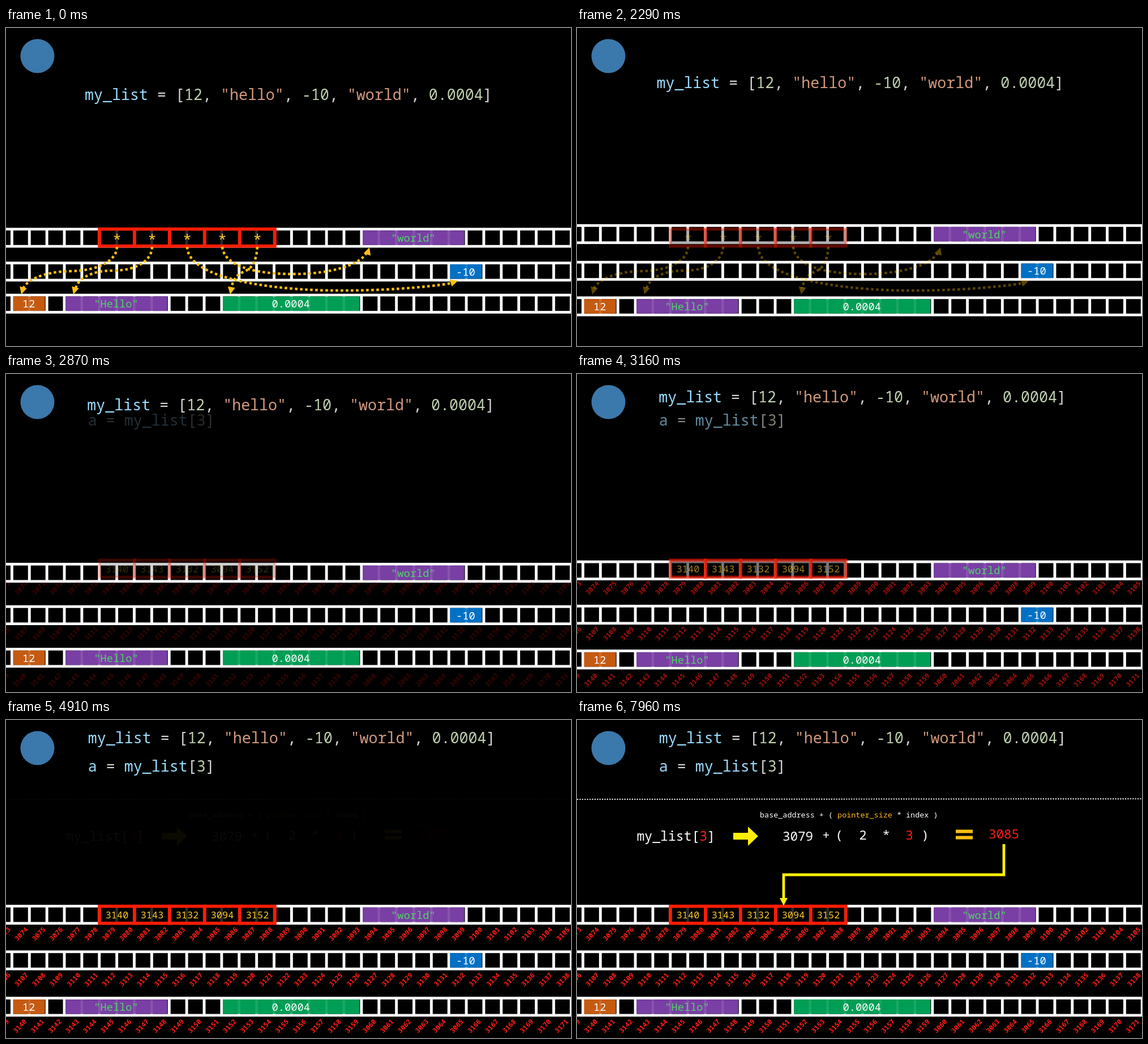
Recreate the animation shown at these times as an HTML page with a canvas. Size 998 px wide and 561 px high, loop 8000 ms.

```html
<!DOCTYPE html>
<html lang="en">
<head>
<meta charset="utf-8">
<title>List memory layout</title>
<style>
html, body { margin: 0; width: 100%; height: 100%; overflow: hidden; background: #000; }
canvas { display: block; }
</style>
</head>
<body>
<canvas id="stage" width="998" height="561"></canvas>
<script>
const ctx = document.getElementById('stage').getContext('2d');
const LOOP = 8000;
const PITCH = 30.87, LEFT = 10.6;
const GOLD = '#ffc010', RED = '#ff1e14', YELLOW = '#ffee08', WHITE = '#fff';
const NAME = '#9cdcfe', PUNCT = '#d4d4d4', NUMBER = '#bfd0b0', STRING = '#d29a7f';

const clamp = v => Math.max(0, Math.min(1, v));
const ramp = (t, from, to) => clamp((t - from) / (to - from));
const mix = (a, b, p) => a + (b - a) * p;
const edge = cell => LEFT + cell * PITCH;

// Slide motion: [time, progress, slope per ms], joined by Hermite curves.
const MOVE = [
  [1930, 0, 0.0005], [2290, 0.24, 0.00078], [2870, 0.73, 0.00074],
  [3580, 0.98, 0.0001], [4120, 1, 0]
];

function moveProgress(t) {
  if (t <= MOVE[0][0]) return 0;
  for (let i = 1; i < MOVE.length; i++) {
    const [t0, p0, s0] = MOVE[i - 1], [t1, p1, s1] = MOVE[i];
    if (t > t1) continue;
    const d = t1 - t0, u = (t - t0) / d, v = 1 - u;
    return p0 * (1 + 2 * u) * v * v + s0 * d * u * v * v +
           p1 * u * u * (3 - 2 * u) - s1 * d * u * u * v;
  }
  return 1;
}

function setFont(size, weight = 400) {
  ctx.font = `${weight} ${size}px "Noto Sans Mono", "DejaVu Sans Mono", monospace`;
}

function label(text, x, y, size, color, align = 'center') {
  setFont(size);
  ctx.textAlign = align;
  ctx.fillStyle = color;
  ctx.fillText(text, x, y);
}

function spans(parts, x, y, size) {
  for (const [text, color] of parts) {
    label(text, x, y, size, color, 'left');
    x += ctx.measureText(text).width;
  }
}

function layer(alpha, draw) {
  if (alpha <= 0) return;
  ctx.save();
  ctx.globalAlpha = alpha;
  draw();
  ctx.restore();
}

function polygon(points, color) {
  ctx.fillStyle = color;
  ctx.beginPath();
  points.forEach(([x, y]) => ctx.lineTo(x, y));
  ctx.fill();
}

const TITLE = [
  ['my_list', NAME], [' = [', PUNCT], ['12', NUMBER], [', ', PUNCT], ['"hello"', STRING],
  [', ', PUNCT], ['-10', NUMBER], [', ', PUNCT], ['"world"', STRING], [', ', PUNCT],
  ['0.0004', NUMBER], [']', PUNCT]
];
const LOOKUP = [['a', NAME], [' = ', PUNCT], ['my_list', NAME], ['[', PUNCT], ['3', NUMBER], [']', PUNCT]];

const GREEN = '#4fd468';
const ROWS = [
  { from: 370, to: 343.5, blocks: [[20, 6, '"world"', '#793fa4', GREEN]] },
  { from: 429.7, to: 424, blocks: [[25, 2, '-10', '#0070c4', WHITE]] },
  { from: 486.3, to: 505.8, blocks: [
    [0, 2, '12', '#c55a11', WHITE],
    [3, 6, '"Hello"', '#793fa4', GREEN],
    [12, 8, '0.0004', '#009e55', WHITE]
  ] }
];

function drawRow(y, blocks) {
  ctx.fillStyle = WHITE;
  ctx.fillRect(0, y - 17.5, 998, 35);
  ctx.fillStyle = '#000';
  for (let i = -1; i < 32; i++) ctx.fillRect(edge(i) + 2.3, y - 12.8, PITCH - 4.9, 25.6);
  for (const [cell, count, text, color, ink] of blocks) {
    const x = edge(cell) + 2, w = count * PITCH - 5.6;
    ctx.fillStyle = color;
    ctx.fillRect(x, y - 12.8, w, 25.6);
    ctx.fillStyle = 'rgba(255,255,255,0.1)';
    for (let i = 1; i < count; i++) ctx.fillRect(edge(cell + i) - 2.5, y - 12.8, 4.5, 25.6);
    label(text, x + w / 2 - 0.5, y + 7, 18.7, ink);
  }
}

function drawSlots(y, texts, size, baseline) {
  for (let i = 0; i < 5; i++) {
    const x = 165 + i * 62;
    ctx.fillStyle = 'rgba(0,0,0,0.84)';
    ctx.fillRect(x, y - 15, 62, 30);
    ctx.strokeStyle = '#ff1c04';
    ctx.lineWidth = 5.6;
    ctx.strokeRect(x, y - 15, 62, 30);
  }
  texts.forEach((text, i) => label(text, 196 + i * 62, baseline, size, '#ffc828'));
}

// Each pointer: dotted path, tip of the head, heading in radians.
const POINTERS = [
  ['M196 386C196 407 170 428 112 429C65 430 34 446 30 461', 27, 470, 1.85],
  ['M258 386C258 407 235 428 188 428C150 428 126 443 123 460', 119, 470, 1.85],
  ['M320 386C322 445 480 462 575 463C660 464 740 458 788 450', 798, 446, -0.3],
  ['M382 386C386 425 455 435 515 434C570 433 622 420 636 398', 642, 387, -1.25],
  ['M444 386C442 412 435 424 420 430C405 436 400 448 398 459', 396, 470, 1.75]
].map(([d, x, y, angle]) => ({ path: new Path2D(d), x, y, angle }));

function drawPointers() {
  ctx.strokeStyle = GOLD;
  ctx.lineWidth = 4.4;
  for (const { path, x, y, angle } of POINTERS) {
    ctx.setLineDash([4.5, 4.5]);
    ctx.stroke(path);
    ctx.save();
    ctx.translate(x, y);
    ctx.rotate(angle);
    polygon([[0, 0], [-13, -6.5], [-13, 6.5]], GOLD);
    ctx.restore();
  }
  ctx.setLineDash([]);
}

function drawAddresses() {
  setFont(11.8, 700);
  ctx.textAlign = 'center';
  ctx.fillStyle = RED;
  [[3074, 27, 377.5], [3107, 27, 458], [3140, 24.5, 540]].forEach(([first, x, y], row) => {
    for (let i = -1; i < 32; i++) {
      const wrapped = row === 2 && i >= 20 && i <= 25;
      ctx.save();
      ctx.translate(x + i * PITCH, y);
      ctx.rotate(-0.81);
      ctx.fillText(first + i - (wrapped ? 100 : 0), 0, 4);
      ctx.restore();
    }
  });
}

function drawFormula() {
  ctx.strokeStyle = '#e4e4e4';
  ctx.lineWidth = 2.2;
  ctx.setLineDash([2.2, 2.2]);
  ctx.beginPath();
  ctx.moveTo(0, 140);
  ctx.lineTo(998, 139);
  ctx.stroke();
  ctx.setLineDash([]);

  spans([['my_list[', WHITE], ['3', RED], [']', WHITE]], 105.5, 213, 23.1);
  polygon([[276, 199], [302, 199], [302, 188], [320, 205], [302, 222], [302, 211], [276, 211]], YELLOW);
  spans([['base_address + ( ', WHITE], ['pointer_size', '#ffb81c'], [' * index )', WHITE]], 323, 172, 13.45);

  label('3079', 390, 213, 22.6, WHITE);
  [['+', 440], ['(', 463], ['2', 505], ['*', 546], ['3', 587], [')', 615]].forEach(
    ([text, x]) => label(text, x, 211, 22.6, text === '3' ? RED : WHITE));
  ctx.fillStyle = GOLD;
  ctx.fillRect(669, 193.5, 30, 6);
  ctx.fillRect(669, 204.5, 30, 6);
  label('3085', 754, 209, 22.6, RED);
}

function drawConnector() {
  ctx.strokeStyle = YELLOW;
  ctx.lineWidth = 4.8;
  ctx.stroke(new Path2D('M754 219V273H365V317'));
  polygon([[358, 314], [372, 314], [365, 327.5]], YELLOW);
}

function render(t) {
  const move = moveProgress(t);
  const before = 1 - ramp(t, 1940, 2490);
  const after = ramp(t, 2720, 3420);

  ctx.fillStyle = '#000';
  ctx.fillRect(0, 0, 998, 561);
  ctx.fillStyle = '#3b78ab';
  ctx.beginPath();
  ctx.arc(55.5, 49.5, 30, 0, Math.PI * 2);
  ctx.fill();

  spans(TITLE, mix(139, 144.8, move), mix(127, 40.8, move), 26.66);
  for (const row of ROWS) drawRow(mix(row.from, row.to, move), row.blocks);

  layer(before, () => {
    drawSlots(369.7, Array(5).fill('*'), 26, 381.5);
    drawPointers();
  });
  layer(after, () => {
    drawSlots(343.6, ['3140', '3143', '3132', '3094', '3152'], 16.9, 350);
    drawAddresses();
    spans(LOOKUP, 144.8, 91, 26.66);
  });
  layer(ramp(t, 4880, 5640), drawFormula);
  layer(ramp(t, 6590, 7390), drawConnector);
}

const start = performance.now();
function tick() {
  render((performance.now() - start) % LOOP);
  requestAnimationFrame(tick);
}
tick();
</script>
</body>
</html>
```
